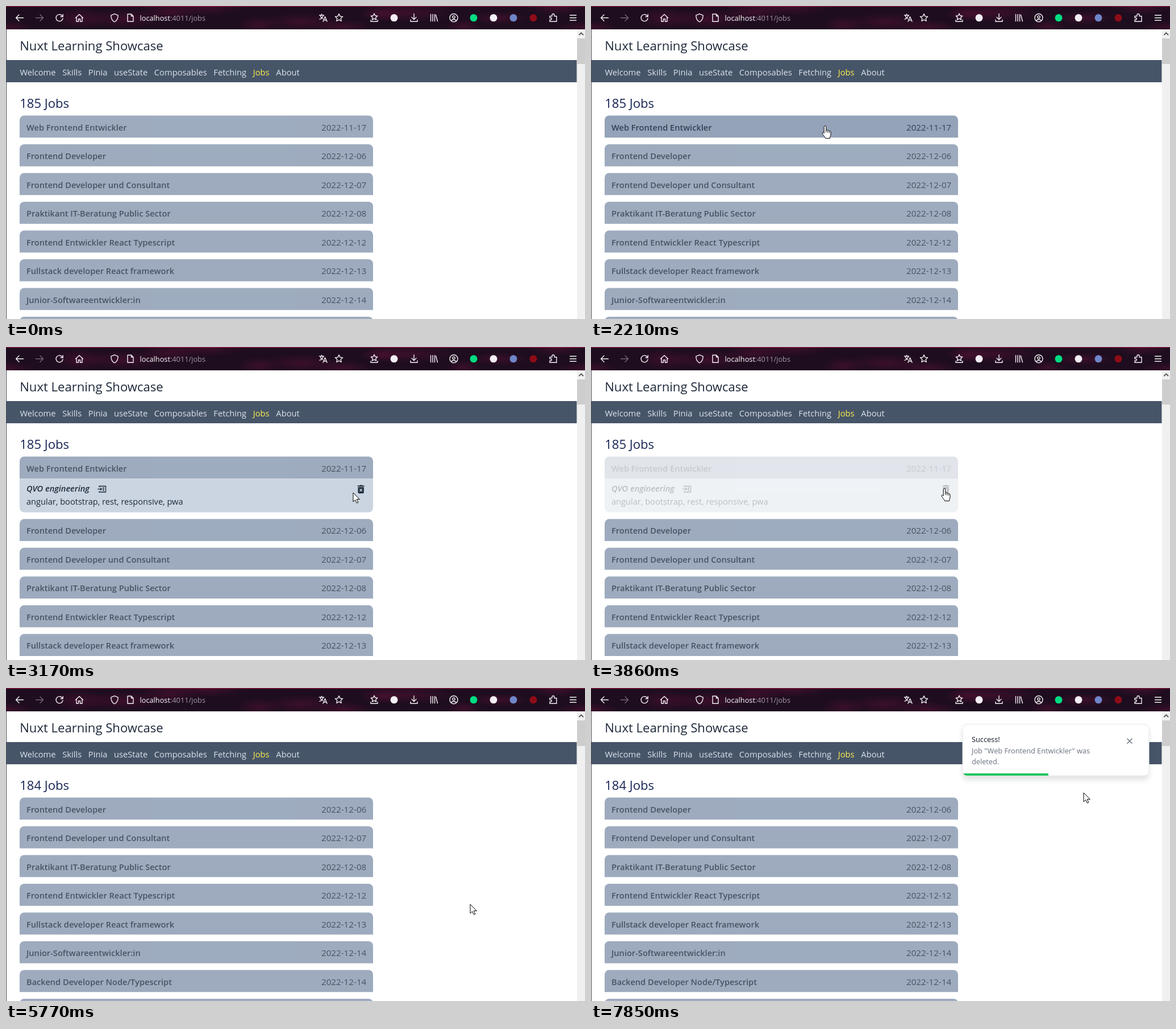
Write an HTML page that moves like this. It is 1019 by 550 pixels and loops after 8000 ms.

```html
<!DOCTYPE html>
<html lang="en">
<head>
<meta charset="utf-8">
<title>Jobs</title>
<style>
  html, body { margin: 0; width: 100%; height: 100%; overflow: hidden; background: #fff; }
  #stage { display: block; width: 1019px; height: 550px; font-family: "Open Sans", "Noto Sans", sans-serif; font-size: 14.7px; }
  text { white-space: pre; }
  .big { font-size: 22.1px; }
  .bold { font-size: 14.6px; font-weight: 600; }
  .date { font-size: 15.2px; }
  .small { font-size: 12.75px; }
  .icon { fill: none; stroke: #f4eff6; stroke-width: 1.4; stroke-linecap: round; stroke-linejoin: round; }
</style>
</head>
<body>
<svg id="stage" viewBox="0 0 1019 550">
  <defs>
    <radialGradient id="glow">
      <stop offset="0" stop-color="#5e1238" stop-opacity=".45"/>
      <stop offset="1" stop-color="#5e1238" stop-opacity="0"/>
    </radialGradient>
    <filter id="shadow" x="-10%" y="-20%" width="120%" height="160%">
      <feDropShadow dx="0" dy="7" stdDeviation="4" flood-color="#000" flood-opacity=".11"/>
    </filter>
    <clipPath id="card"><rect x="654" y="63.5" width="328" height="90.5" rx="8"/></clipPath>
  </defs>
  <rect width="1019" height="550" fill="#fff"/>

  <text class="big" x="24.2" y="78" fill="#1e293b">Nuxt Learning Showcase</text>
  <rect x="1" y="95" width="1003.5" height="39" fill="#475569"/>
  <text id="nav" x="24.5" y="122" fill="#dbe3ec"></text>
  <text id="count" class="big" x="24.2" y="179" fill="#172554"></text>
  <g id="rows"></g>
  <g id="details" fill="#1e293b">
    <path d="M24 231.3H646V282.5a8 8 0 0 1-8 8H32a8 8 0 0 1-8-8Z" fill="#cbd5e1"/>
    <text class="bold" x="36" y="253.5" font-style="italic">QVO engineering</text>
    <text x="36" y="277" font-size="14.6">angular, bootstrap, rest, responsive, pwa</text>
    <path d="M164 246.5V244.5H175.5V255H164V253M161 249.7H168M165.8 247.3L168.3 249.7 165.8 252.1M170 247.5H173M170 249.8H173M170 252.1H173" fill="none" stroke="#1e293b" stroke-width="1.3"/>
    <path d="M618.5 243.5H622L623 242.5H626.5L627.5 243.5H630.7V245.3H618.5ZM619.5 246.3H629.8V255.5a1.7 1.7 0 0 1-1.7 1.7H621.2a1.7 1.7 0 0 1-1.7-1.7Z"/>
    <path d="M622.5 249.2L626.8 253.8M626.8 249.2L622.5 253.8" stroke="#cbd5e1" stroke-width="1.4"/>
  </g>

  <rect x="1005" y="41" width="14" height="509" fill="#f0f0f0"/>
  <path d="M1008.5 51L1012.3 47.2 1016.1 51" fill="none" stroke="#505050" stroke-width="1.8"/>
  <rect id="thumb" x="1005" y="57" width="14" fill="#cdcdcd"/>
  <rect y="41" width="1" height="509" fill="#4b4d55"/>

  <svg width="1019" height="41">
    <rect width="1019" height="41" fill="#1d0d1e"/>
    <g id="glows" fill="url(#glow)"></g>
    <rect width="1019" height="1.2" fill="#8f1b3c"/>
    <text class="small" x="235.5" y="26" fill="#fbfbfe">localhost<tspan fill="#a297a6">:4011/jobs</tspan></text>
    <g id="icons"></g>
  </svg>

  <g id="toast">
    <rect x="654" y="63.5" width="328" height="90.5" rx="8" fill="#fff" stroke="#e5e7eb" filter="url(#shadow)"/>
    <text class="small" x="670" y="95" fill="#111827">Success!</text>
    <text class="small" fill="#6b7280"><tspan x="670" y="115">Job "Web Frontend Entwickler" was</tspan><tspan x="670" y="134">deleted.</tspan></text>
    <path d="M943.5 88.7l9 9m0-9l-9 9" stroke="#6b7280" stroke-width="1.5"/>
    <g clip-path="url(#card)"><rect id="progress" x="654" y="150" height="4" fill="#22c55e"/></g>
  </g>

  <g id="cursor" fill="#fff" stroke="#000" stroke-linejoin="round">
    <path id="arrow" d="M0 0V16L3.7 12.6 6.2 18.2 8.8 17.1 6.3 11.6H11.3Z"/>
    <g id="hand">
      <path d="M-1.8 12.5V1.5a1.8 1.8 0 0 1 3.6 0V7.5a1.7 1.7 0 0 1 3 .7 1.7 1.7 0 0 1 2.8.8 1.6 1.6 0 0 1 2.4 1.3V15c0 2-1.4 3.5-1.4 5V21.5H.5C.2 19-3.4 16.5-5 12.8-5.3 10.5-3 10.4-1.8 12.5Z"/>
      <path d="M1.8 7.5V11M4.8 8.5V11.5M7.6 9.5V12" fill="none"/>
    </g>
  </g>
</svg>
<script>
const LOOP = 8000, HOVER_LAG = 130;
const ROW_TOP = 192.5, PITCH = 50.5, ROW_HEIGHT = 38.8, DETAILS = 59.3;
const OPEN = 2330, DELETE = 3740, GONE = 5770, TOAST = 6170, TOAST_LIFE = 3000;
const $ = id => document.getElementById(id);

const pages = ["Welcome", "Skills", "Pinia", "useState", "Composables", "Fetching", "Jobs", "About"];
const jobs = [
  "Web Frontend Entwickler 2022-11-17",
  "Frontend Developer 2022-12-06",
  "Frontend Developer und Consultant 2022-12-07",
  "Praktikant IT-Beratung Public Sector 2022-12-08",
  "Frontend Entwickler React Typescript 2022-12-12",
  "Fullstack developer React framework 2022-12-13",
  "Junior-Softwareentwickler:in 2022-12-14",
  "Backend Developer Node/Typescript 2022-12-14",
  "Frontend Developer 2022-12-15"
];

const bursts = [[580, 1510], [1630, 1900], [2210, OPEN], [2610, 3460], [DELETE, 4600], [GONE, GONE], [TOAST, 7150], [7300, 7850]];

// Pointer moves: start, end, and where the move arrives.
const entry = [894, 439];
const moves = [
  [580, 820, 662, 380], [820, 940, 475, 330], [940, 1900, 412, 211], [OPEN, 2890, 520, 287],
  [2890, 3170, 611, 256], [3170, 3460, 622, 249], [DELETE, 4600, 817, 380], [TOAST, 7300, 867, 184]
];

const circle = (r, y = 0) => `M${-r} ${y}a${r} ${r} 0 1 0 ${2 * r} 0a${r} ${r} 0 1 0 ${-2 * r} 0`;

function star(r, dy = 0) {
  const points = Array.from({ length: 10 }, (_, i) => {
    const angle = i * Math.PI / 5, size = i % 2 ? r * .48 : r;
    return (size * Math.sin(angle)).toFixed(1) + " " + (dy - size * Math.cos(angle)).toFixed(1);
  });
  return "M" + points.join("L") + "Z";
}

const shapes = {
  back: "M6.5 0H-6.5M-1-5.5L-6.5 0-1 5.5",
  forward: "M-6.5 0H6.5M1-5.5L6.5 0 1 5.5",
  reload: "M5.5-2.5A6 6 0 1 0 6 1M6.2-6V-2H2.2",
  home: "M-6.500 0L0-6 6.500 0M-5-1V6.500H-1.500V2H1.500V6.500H5V-1",
  shield: "M0-7L6.2-4.5C6.2 2 3.5 5.5 0 7-3.5 5.5-6.2 2-6.2-4.5Z",
  file: "M-5-6.5H1.5L5-3V6.5H-5ZM1.5-6.5V-3H5",
  translate: "M-6.5-4.5H1.5M-2.5-6.5V-4.5M.5-4.5C-.5-1-3 1.5-6 2.5M-5-4.5C-4-1-2 1-.5 1.5M0 6.5L3.5-2 7 6.5M1.2 4H5.8",
  star: star(7),
  saved: star(6, -1.5) + "M-6 4V6.5H6V4",
  download: "M0-7V3M-4-1L0 3 4-1M-6 3.5V6.5H6V3.5",
  library: "M-5.5-6V6M-2-6V6M1.5-6V6M3.5-5L6.5 6",
  account: circle(7) + circle(2.2, -1.5) + "M-4 5C-3 2 3 2 4 5",
  puzzle: "M-6-3H-2V-5A1.8 1.8 0 0 1 2-5V-3H6V6.5H-6V3.5H-4A1.8 1.8 0 0 0-4 0H-6Z",
  menu: "M-5.5-4.5h11m-11 4.5h11m-11 4.5h11"
};

// Evenly spaced icons; a colour stands for a plain disc.
function iconRow(x, pitch, names) {
  return names.split(" ").map((name, i) => {
    const place = `transform="translate(${x + i * pitch} 20.8)"`;
    return name in shapes
      ? `<path class="icon" ${place} d="${shapes[name]}" opacity="${name === "forward" ? .4 : 1}"/>`
      : `<circle ${place} r="6.5" fill="${name}"/>`;
  }).join("");
}

$("icons").innerHTML = iconRow(24, 35, "back forward reload home")
  + iconRow(191, 28, "shield file")
  + iconRow(558, 28, "translate star")
  + iconRow(648, 35, "saved #f4eff6 download library account #00dc82 #f4eff6 #6f86c9 #8e0c18 puzzle menu");

let seed = 7;
const random = () => (seed = seed * 16807 % 2147483647) / 2147483647;
$("glows").innerHTML = Array.from({ length: 14 }, (_, i) =>
  `<ellipse cx="${(i + random()) * 75}" cy="${random() * 41}" rx="${30 + random() * 60}" ry="${10 + random() * 12}"/>`).join("");

$("nav").innerHTML = pages.map((name, i) =>
  `<tspan dx="${i && 11.7}"${name === "Jobs" ? ' fill="#fdf04a"' : ""}>${name}</tspan>`).join("");

$("rows").innerHTML = jobs.map(job => `<g>
  <path d="M24 ${ROW_HEIGHT}V8a8 8 0 0 1 8-8H638a8 8 0 0 1 8 8V${ROW_HEIGHT}Z" fill="#94a3b8"/>
  <text class="bold" x="36" y="26" fill="#334155">${job.slice(0, -11)}</text>
  <text class="date" x="555" y="26" fill="#334155">${job.slice(-10)}</text></g>`).join("");
const rows = [...$("rows").children];

const clamp = v => Math.min(1, Math.max(0, v));
const easeOut = (k, power) => 1 - (1 - clamp(k)) ** power;

function captured(time) {
  const burst = bursts.filter(([start]) => start <= time).pop();
  if (!burst) return 0;
  const [start, end] = burst;
  const pace = start < 2500 ? 120 : 140;
  return time >= end ? end : start + Math.floor((time - start) / pace) * pace;
}

function cursorAt(t) {
  if (t < moves[0][0]) return null;
  let [x, y] = entry;
  for (const [start, end, toX, toY] of moves) {
    const k = easeOut((t - start) / (end - start), 1.3);
    x += (toX - x) * k;
    y += (toY - y) * k;
  }
  return [x, y];
}

function rowTop(i, t) {
  if (t >= GONE) return ROW_TOP + PITCH * (i - 1);
  return ROW_TOP + PITCH * i + (t >= OPEN && i > 0 ? DETAILS : 0);
}

function rowUnder(point, t) {
  if (!point || point[0] < 24 || point[0] > 646) return -1;
  return jobs.findIndex((_, i) => point[1] >= rowTop(i, t) && point[1] <= rowTop(i, t) + ROW_HEIGHT);
}

function show(el, visible) {
  el.style.display = visible ? "" : "none";
}

function render(time) {
  const t = captured(time);
  const open = t >= OPEN && t < GONE;
  const faded = t >= DELETE ? .3 : 1;

  const hovered = rowUnder(cursorAt(t - HOVER_LAG), t);
  rows.forEach((row, i) => {
    row.setAttribute("transform", `translate(0 ${rowTop(i, t)})`);
    row.setAttribute("opacity", (i === hovered ? 1 : .9) * (i ? 1 : faded));
  });
  show(rows[0], t < GONE);
  show($("details"), open);
  $("details").setAttribute("opacity", faded);
  $("count").textContent = (t < GONE ? 185 : 184) + " Jobs";
  $("thumb").setAttribute("height", open ? 44 : 45);

  const point = cursorAt(t);
  show($("cursor"), point);
  if (point) {
    const [x, y] = point;
    const onBin = open && Math.abs(x - 624.5) < 7.5 && Math.abs(y - 250) < 8;
    const link = onBin || rowUnder(point, t) >= 0;
    show($("hand"), link);
    show($("arrow"), !link);
    $("cursor").setAttribute("transform", `translate(${Math.round(x)} ${Math.round(y)})`);
  }

  const age = t - TOAST;
  show($("toast"), age >= 0);
  $("toast").setAttribute("opacity", easeOut((age + 60) / 300, 2));
  $("progress").setAttribute("width", 328 * clamp(1 - (age - 60) / TOAST_LIFE));
}

const start = performance.now();
function loop() {
  render((performance.now() - start) % LOOP);
  requestAnimationFrame(loop);
}
loop();
</script>
</body>
</html>
```
